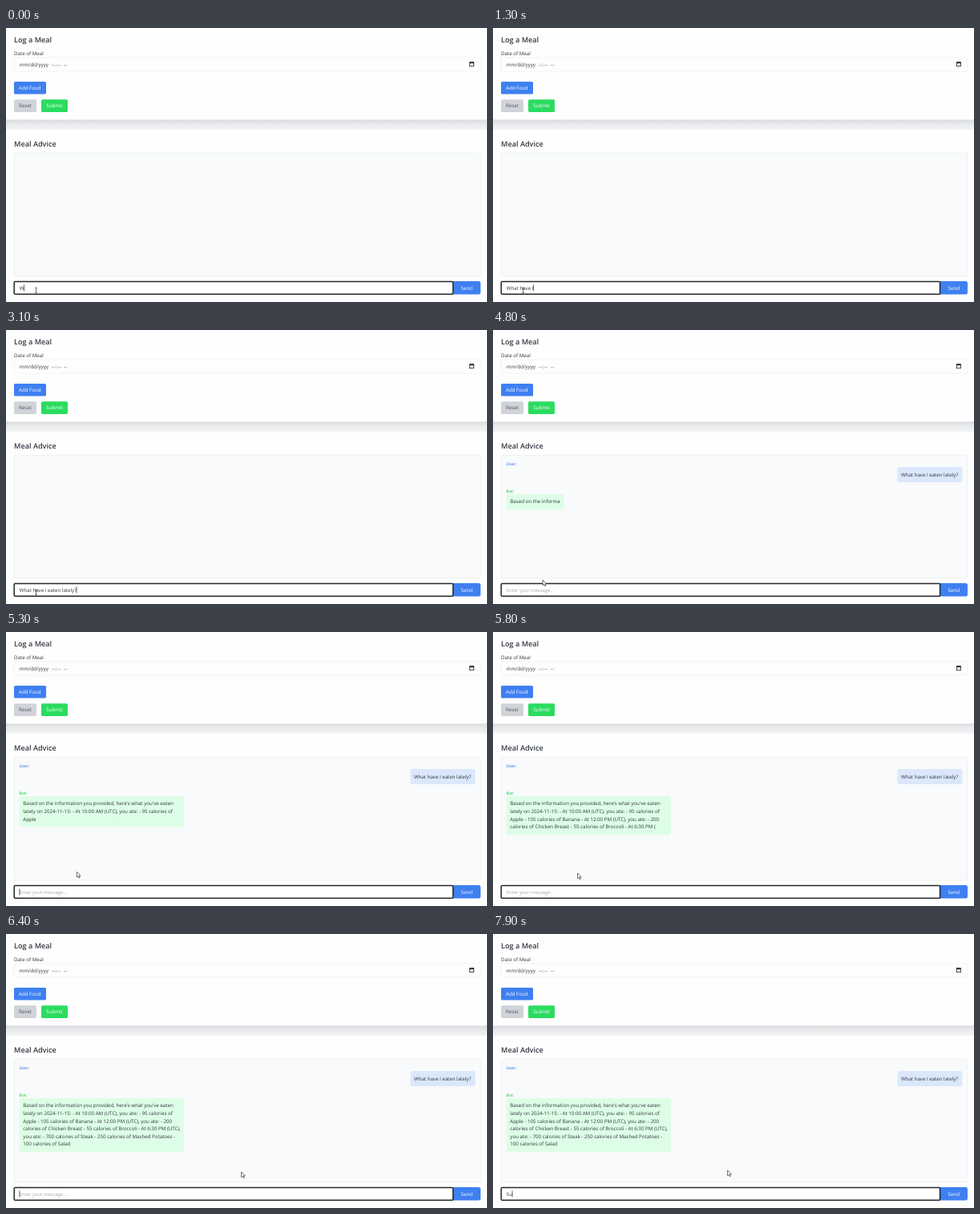
Recreate the animation shown at these times as an HTML page. Size 600 by 342 pixels, loop 8 s.

```html
<!DOCTYPE html>
<html lang="en">
<head>
<meta charset="utf-8">
<title>Meal log</title>
<style>
  html, body { margin: 0; width: 100%; height: 100%; overflow: hidden; background: #fefefe; }
  svg { display: block; width: 600px; height: 342px; }
  text { font-family: "Open Sans", "Noto Sans", sans-serif; font-size: 6.2px; fill: #30353d; text-rendering: geometricPrecision; white-space: pre; }
  .head { font-size: 9.15px; font-weight: 600; fill: #343a43; }
  .label { font-size: 5px; font-weight: 600; }
  .light { fill: #fff; }
  .field { font-size: 6.15px; }
  .hint { font-size: 5.9px; fill: #a3a7ae; }
</style>
</head>
<body>
<svg viewBox="0 0 600 342">
  <defs>
    <linearGradient id="shade" x1="0" y1="0" x2="0" y2="1">
      <stop offset="0" stop-color="#d9dadd"/>
      <stop offset=".45" stop-color="#e9eaec"/>
      <stop offset="1" stop-color="#f3f4f5"/>
    </linearGradient>
  </defs>

  <rect width="600" height="342" fill="#fefefe"/>
  <rect y="110" width="600" height="17" fill="#eff0f2"/>
  <rect y="114" width="600" height="13" fill="url(#shade)"/>
  <path d="M0 0H600V112Q600 114.5 597 114.5H3Q0 114.5 0 112Z" fill="#fefefe"/>

  <text class="head" x="10" y="18">Log a Meal</text>
  <text x="10" y="34">Date of Meal</text>
  <rect x="10" y="37" width="582" height="17" rx="2" fill="#fefefe" stroke="#eceef0" stroke-width=".7"/>
  <text x="16.8" y="47.6">mm/dd/yyyy</text>
  <text x="57" y="47.6" letter-spacing=".45">--:--</text>
  <text x="72" y="47.6" letter-spacing=".4">--</text>
  <g fill="none" stroke="#222" stroke-width=".8">
    <rect x="578.4" y="42.9" width="5" height="4.8"/>
    <path d="M578 43.4H583.8" stroke-width="1.5"/>
    <path d="M579.6 41.8V43M582.2 41.8V43"/>
  </g>

  <rect x="10" y="67" width="40" height="15.6" rx="1.6" fill="#3f80f1"/>
  <text class="light" x="16" y="77">Add Food</text>
  <rect x="10" y="89.3" width="28" height="15.6" rx="1.6" fill="#d0d3d8"/>
  <text x="16" y="99.4" style="fill:#4f5661">Reset</text>
  <rect x="44" y="89.3" width="33" height="15.6" rx="1.6" fill="#2bdc60"/>
  <text class="light" x="50.2" y="99.4">Submit</text>

  <text class="head" x="10" y="147.5">Meal Advice</text>
  <rect x="10" y="156.3" width="582" height="153.5" rx="2" fill="#f8fafb" stroke="#e9ebee" stroke-width=".7"/>

  <g id="user">
    <text class="label" x="16.6" y="169" style="fill:#4d83ea">User:</text>
    <rect x="504.5" y="171" width="80.7" height="19" rx="2" fill="#dbe8fc"/>
    <text x="509" y="183" class="field">What have I eaten lately?</text>
  </g>
  <g id="bot">
    <text class="label" x="16.6" y="202.6" style="fill:#35d062">Bot:</text>
    <rect id="bubble" x="16.5" y="205" rx="2" fill="#defde6"/>
    <g id="reply"></g>
  </g>

  <path d="M557 316H589.5Q592 316 592 318.5V330Q592 332.5 589.5 332.5H557Z" fill="#3f80f1"/>
  <text class="light" x="567.6" y="326.7">Send</text>
  <rect x="10.2" y="316.4" width="547.4" height="15.9" rx="1.3" fill="#fff" stroke="#24272c" stroke-width="1.5"/>
  <text id="hint" class="hint" x="16.8" y="326.7">Enter your message...</text>
  <text id="typed" class="field" x="16.8" y="326.7"></text>
  <path id="caret" d="M.3 320.4V328.4" stroke="#222" stroke-width=".7"/>

  <path id="beam" d="M36.3 324.3H38.9M37.6 324.3V330.6M36.3 330.6H38.9" stroke="#333" stroke-width=".7" fill="none"/>
  <path id="arrow" d="M0 0V6.7L1.6 5.3L2.7 7.7L3.8 7.2L2.8 4.9H4.7Z" fill="#fff" stroke="#333" stroke-width=".7" stroke-linejoin="round"/>
</svg>
<script>
const $ = id => document.getElementById(id);
const LOOP = 8000;
const QUESTION = "What have I eaten lately?";
const NEXT = "Su";
const LINES = [
  "Based on the information you provided, here's what you've eaten",
  "lately on 2024-11-15: - At 10:00 AM (UTC), you ate: - 95 calories of",
  "Apple - 105 calories of Banana - At 12:00 PM (UTC), you ate: - 200",
  "calories of Chicken Breast - 55 calories of Broccoli - At 6:30 PM (UTC),",
  "you ate: - 700 calories of Steak - 250 calories of Mashed Potatoes -",
  "100 calories of Salad"
];
const SENT = 4200, ANSWER = 4800, RETYPE = 7800;

// [time, characters]
const TYPING = [[0, 1], [400, 2], [600, 4], [700, 6], [1000, 7], [1100, 8], [1200, 10], [1300, 11],
  [1500, 13], [1600, 14], [1700, 16], [2600, 17], [2700, 19], [2800, 20], [2900, 22], [3000, 23], [3100, 25]];
const STREAM = [[4800, 20], [5000, 95], [5200, 95], [5300, 136], [5800, 264], [6100, 358]];
// [time, x, y]
const POINTER = [[4800, 62, 312], [4900, 78, 303], [5000, 88.3, 299.4], [5300, 88.3, 299.4], [5800, 105.5, 301],
  [6100, 250, 299.5], [6200, 280, 298], [6400, 293.6, 297], [6900, 293.6, 297], [7100, 292.6, 295]];

const held = (keys, t) => keys.filter(k => k[0] <= t).pop()[1];

function blend(keys, t, col = 1) {
  const i = keys.findIndex(k => k[0] > t);
  if (i < 0) return keys[keys.length - 1][col];
  if (i === 0) return keys[0][col];
  const a = keys[i - 1], b = keys[i];
  return a[col] + (b[col] - a[col]) * (t - a[0]) / (b[0] - a[0]);
}

const show = (el, on) => el.setAttribute("visibility", on ? "visible" : "hidden");

const rows = LINES.map((_, i) => {
  const row = document.createElementNS("http://www.w3.org/2000/svg", "text");
  row.setAttribute("x", 21.3);
  row.setAttribute("y", 216.4 + i * 9.6);
  $("reply").append(row);
  return row;
});

function drawReply(t) {
  let left = Math.round(blend(STREAM, t));
  let used = 0;
  LINES.forEach((line, i) => {
    const part = line.slice(0, Math.max(0, left));
    left -= line.length;
    rows[i].textContent = part;
    if (part) used++;
  });
  const width = used > 1 ? 205.5 : Math.min(205.5, rows[0].getComputedTextLength() + 9.6);
  $("bubble").setAttribute("width", width);
  $("bubble").setAttribute("height", 9.5 + 9.6 * used);
}

function drawInput(t) {
  let text = "";
  if (t < SENT) text = QUESTION.slice(0, held(TYPING, t));
  else if (t >= RETYPE) text = NEXT.slice(0, 1 + (t - RETYPE) / 100);
  $("typed").textContent = text;
  show($("hint"), !text);
  const x = 16.6 + (text ? $("typed").getComputedTextLength() : 0);
  $("caret").setAttribute("transform", `translate(${x} 0)`);
  const off = (t >= 4800 && t < 5300) || (t >= 5800 && t < 6400) || (t >= 6900 && t < RETYPE);
  show($("caret"), !off);
}

function draw(ms) {
  const t = Math.floor(ms % LOOP / 100) * 100;
  drawInput(t);
  show($("user"), t >= SENT);
  show($("bot"), t >= ANSWER);
  if (t >= ANSWER) drawReply(t);
  show($("beam"), t < ANSWER);
  show($("arrow"), t >= ANSWER);
  $("arrow").setAttribute("transform", `translate(${blend(POINTER, t)} ${blend(POINTER, t, 2)})`);
}

let start;
function tick(now) {
  start ??= now;
  draw(now - start);
  requestAnimationFrame(tick);
}
draw(0);
requestAnimationFrame(tick);
</script>
</body>
</html>
```
